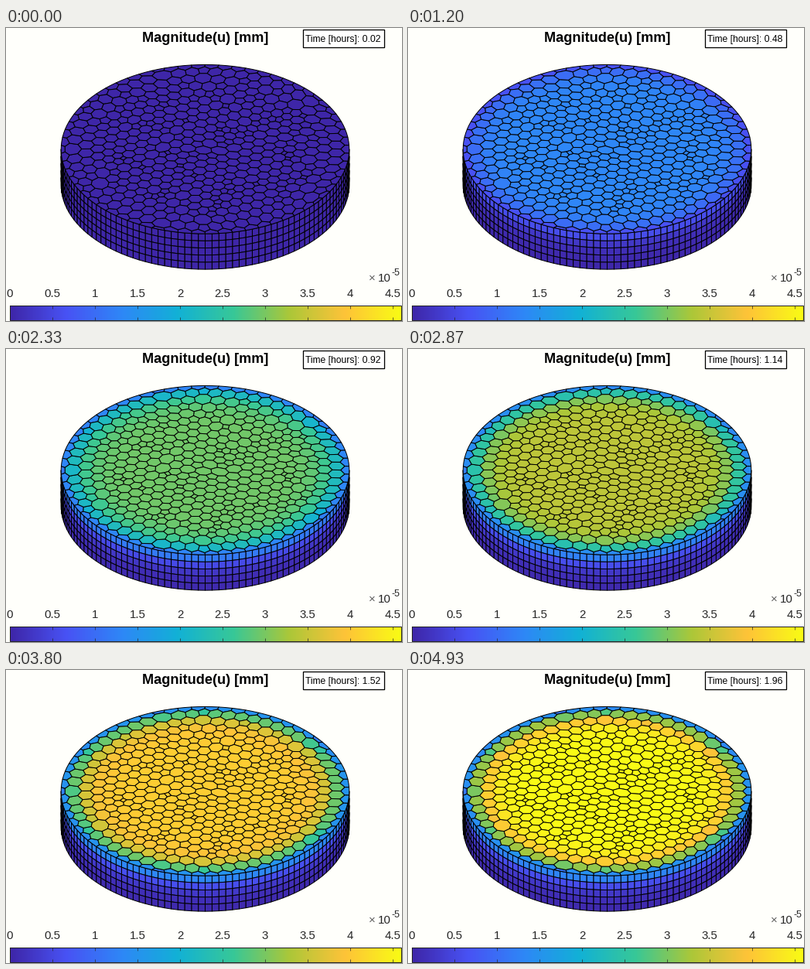
Recreate the animation shown at these times as a matplotlib script. Size 512 by 379 pixels, loop 4990 ms.

```python
import numpy as np
import matplotlib.pyplot as plt
from matplotlib.animation import FuncAnimation
from matplotlib.collections import PolyCollection
from matplotlib.colors import LinearSegmentedColormap, Normalize
from matplotlib.patches import Rectangle
from matplotlib.tri import Triangulation

W, H, DPI = 512, 379, 64
FRAMES, LOOP = 75, 4990
PX = 72 / DPI                       # points per pixel
CX, CY, R, TILT = 257.5, 156.8, 186.3, 0.587
DEPTH, LAYERS = 46, 5
RIM, STEP = 66, 15.7
U_MAX = 4.6
INK = "#262626"

plt.rcParams["font.family"] = "Liberation Sans"

HEAT = LinearSegmentedColormap.from_list("heat", [
    "#3e26a8", "#4852f4", "#2e87f7", "#12b1d6",
    "#37c897", "#abc739", "#fec338", "#f9fb15"])
NORM = Normalize(0, U_MAX)


def circle(n, radius, phase=0.0):
    a = 2 * np.pi * (np.arange(n) + phase) / n
    return np.c_[radius * np.cos(a), radius * np.sin(a)]


def project(p, drop=0.0):
    return np.c_[CX + p[:, 0], CY + TILT * p[:, 1] + drop]


def seed_points():
    """Even rings at the rim, a loose hexagonal grid inside."""
    rng = np.random.default_rng(11)
    rings = [circle(round(RIM * (1 - gap / R)), R - gap, k / 2)
             for k, gap in enumerate((0, 15.5, 31))]
    i, j = np.meshgrid(np.arange(-25, 26), np.arange(-25, 26))
    z = STEP * (i + j * np.exp(1j * np.pi / 3)).ravel()
    z = z * np.exp(1j * np.radians(37.5))
    z = z[abs(z) < R - 41]
    # a few added points crowd their neighbours into smaller cells
    far = (R - 45) * np.sqrt(rng.uniform(.05, 1, 24))
    z = np.append(z, far * np.exp(2j * np.pi * rng.random(24)))
    grid = np.c_[z.real, z.imag]
    return np.vstack(rings + [grid + rng.normal(0, 2.6, grid.shape)])


def smooth(p, rounds=5):
    for _ in range(rounds):
        a, b = Triangulation(*p.T).edges.T
        total, count = np.zeros_like(p), np.zeros(len(p))
        for u, v in ((a, b), (b, a)):
            np.add.at(total, u, p[v])
            np.add.at(count, u, 1)
        mean = total / np.maximum(count, 1)[:, None]
        p[RIM:] += 0.6 * (mean[RIM:] - p[RIM:])
    return p


def dual_cells(p):
    """Cells around each point, joined through triangle centroids."""
    rings = [[] for _ in p]
    for t in Triangulation(*p.T).triangles:
        for v in t:
            rings[v].append(p[t].mean(axis=0))
    mids = circle(RIM, R, .5)
    cells = []
    for k, ring in enumerate(rings):
        if k < RIM:
            ring = ring + [mids[k - 1], p[k], mids[k]]
        ring = np.array(ring)
        d = ring - ring.mean(axis=0)
        cells.append(ring[np.argsort(np.arctan2(d[:, 1], d[:, 0]))])
    return cells


cells = dual_cells(smooth(seed_points()))
centers = np.array([c.mean(axis=0) for c in cells])
inset = np.maximum(R - np.hypot(*centers.T), 0)
top_faces = [project(c) for c in cells]

front = circle(2 * RIM, R)[:RIM + 1]
levels = [project(front, DEPTH * k / LAYERS) for k in range(LAYERS + 1)]
side_faces = [np.array([up[n], up[n + 1], low[n + 1], low[n]])
              for up, low in zip(levels, levels[1:]) for n in range(RIM)]
fade = np.repeat(np.exp(-.75 * np.arange(LAYERS)), RIM)


def field(t):
    """Values on the top cells and on the side faces at time t."""
    onset = 1 / (1 + np.exp(-11.8 * (t - .392)))
    peak = 6 * (1 - np.exp(-t / 1.347)) * onset
    loss = .57 + .15 * t
    top = peak * (1 - loss * np.exp(-inset / 16))
    side = .9 * peak * (1 - .8 * loss) * fade
    return top, side


fig = plt.figure(figsize=(W / DPI, H / DPI), dpi=DPI, facecolor="#fffffb")
ax = fig.add_axes([0, 0, 1, 1])


def label(x, y, s, size, **kw):
    kw = {"ha": "center", "va": "baseline", "color": INK, **kw}
    return ax.text(x, y, s, fontsize=size * PX, **kw)


def mesh(faces):
    pc = PolyCollection(faces, cmap=HEAT, norm=NORM, edgecolors="black",
                        linewidths=PX, joinstyle="round")
    return ax.add_collection(pc)


side, top = mesh(side_faces), mesh(top_faces)

# colour bar
ax.imshow(np.linspace(0, 1, 256)[None, :], cmap=HEAT, aspect="auto",
          extent=(5, 511, 378, 359), interpolation="nearest")
ax.add_patch(Rectangle((5, 359), 506, 19, fill=False, ec=INK, lw=PX))
for k in range(10):
    x = 5 + 55 * k
    label(x, 348, f"{k / 2:g}", 15)
    ax.vlines([x, x], [359, 374], [363, 378], color=INK, lw=.7 * PX)
label(473.5, 328, "×", 15, color="#606060")
label(489, 328, "10", 15)
label(503.5, 320, "-5", 12.5)

label(257.5, 18, "Magnitude(u) [mm]", 18.1, weight="bold", color="black")
ax.add_patch(Rectangle((384, 2), 105, 22.5, fc="white", ec="black",
                       lw=1.3 * PX))
clock = label(387, 18, "", 12.1, ha="left", color="black")

ax.set_xlim(0, W)
ax.set_ylim(H, 0)
ax.axis("off")


def update(n):
    t = .02 * max(1, 4 * n // 3)
    u_top, u_side = field(t)
    top.set_array(u_top)
    side.set_array(u_side)
    clock.set_text(f"Time [hours]: {t:.2f}")
    return top, side, clock


anim = FuncAnimation(fig, update, frames=FRAMES, interval=LOOP / FRAMES,
                     repeat=True, repeat_delay=0, blit=False)
plt.show()
```
